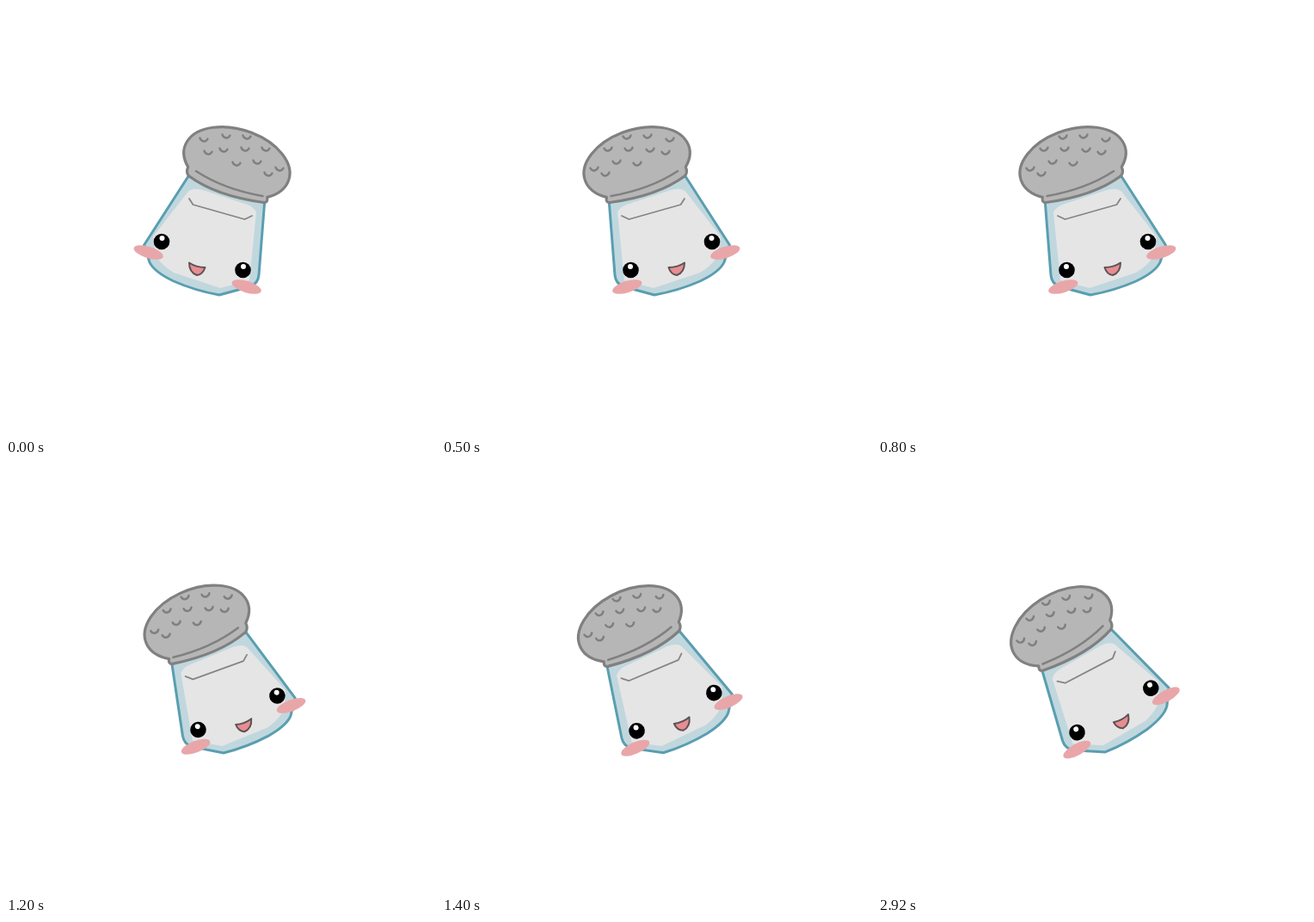
Animation of 500 by 500 pixels, one loop 3800 ms. Source, as an HTML page:

```html
<!DOCTYPE html>
<html lang="en">
<head>
<meta charset="utf-8">
<title>Salt shaker</title>
<style>
  html, body { margin: 0; width: 100%; height: 100%; overflow: hidden; background: #fff; }
  svg { display: block; width: 100%; height: 100%; }
</style>
</head>
<body>
<svg viewBox="0 0 500 500">
  <g id="shaker" stroke-linecap="round" stroke-linejoin="round">
    <path fill="#c0d7de" stroke="#599eb0" stroke-width="3"
      d="M194 224 L201 313 Q202 322 210 326 L247 336 Q275 331 300 320 Q323 309 328 298 L334.500 278 L283 198 Z"/>
    <path fill="#e5e5e5"
      d="M204 240 Q207 233 217 230 L266 214 Q280 210 285 218 L324 268 L321 290 Q314 302 300 310 L246 328 L212 319 Z"/>
    <path fill="none" stroke="#858585" stroke-width="1.8" d="M209 244 L217.500 248 L277.500 231 L282 224"/>
    <g stroke="#808080" stroke-width="3.200">
      <path fill="#b6b6b6"
        d="M191.400 222.400 A63.500 39 -18 1 1 283.300 187.200 Q286 193 282.500 197.500 Q251 221 195 228.500 Q190 228.500 191.400 222.400 Z"/>
      <path fill="none" stroke-width="2.600" d="M196.500 221 Q242 213 274 192"/>
    </g>
    <g id="holes" fill="none" stroke="#808080" stroke-width="2.500"></g>
    <g id="face"></g>
    <path fill="#e88d92" stroke="#5c5355" stroke-width="2"
      d="M263.500 304 Q274 304 282 298.500 Q282 310 273 313 Q266 312 263.500 304 Z"/>
  </g>
</svg>
<script>
const LOOP = 3800;
const PIVOT = "250.400 251";
const MIRROR = "translate(495 0) scale(-1 1)";
// Each pose holds from its start time.
const POSES = [
  { at: 0, mirror: true, tilt: 0 },
  { at: 500, tilt: 0 },
  { at: 1000, tilt: -2.3 },
  { at: 1200, tilt: -4 },
  { at: 1400, tilt: -7 },
  { at: 1600, tilt: -11.7 }
];
const HOLES = [
  [177, 189], [190, 195], [193, 166], [203, 181], [215, 152], [217, 166],
  [227, 183], [239, 151], [242, 167], [260, 170], [265, 155]
];

const byId = id => document.getElementById(id);
const shaker = byId("shaker");

byId("holes").innerHTML = HOLES.map(([x, y]) =>
  `<path d="M${x - 4.5} ${y - 0.5} q1.500 3 4.500 3 q3.500 -.5 4.500 -4"/>`).join("");

const eye = (x, y) =>
  `<circle cx="${x}" cy="${y}" r="9.300"/><circle cx="${x - 0.5}" cy="${y - 3.900}" r="3" fill="#fff"/>`;
const cheek = (x, y) =>
  `<ellipse rx="17.800" ry="6.700" fill="#e9a6a9" transform="translate(${x} ${y}) rotate(-17)"/>`;
byId("face").innerHTML = eye(219.5, 307) + eye(314, 274) + cheek(215.3, 326.5) + cheek(329.3, 286.5);

function draw(time) {
  const t = time % LOOP;
  const pose = POSES.filter(p => p.at <= t).pop();
  shaker.setAttribute("transform", pose.mirror ? MIRROR : `rotate(${pose.tilt} ${PIVOT})`);
}

const start = performance.now();
function tick() {
  draw(performance.now() - start);
  requestAnimationFrame(tick);
}
tick();
</script>
</body>
</html>
```
